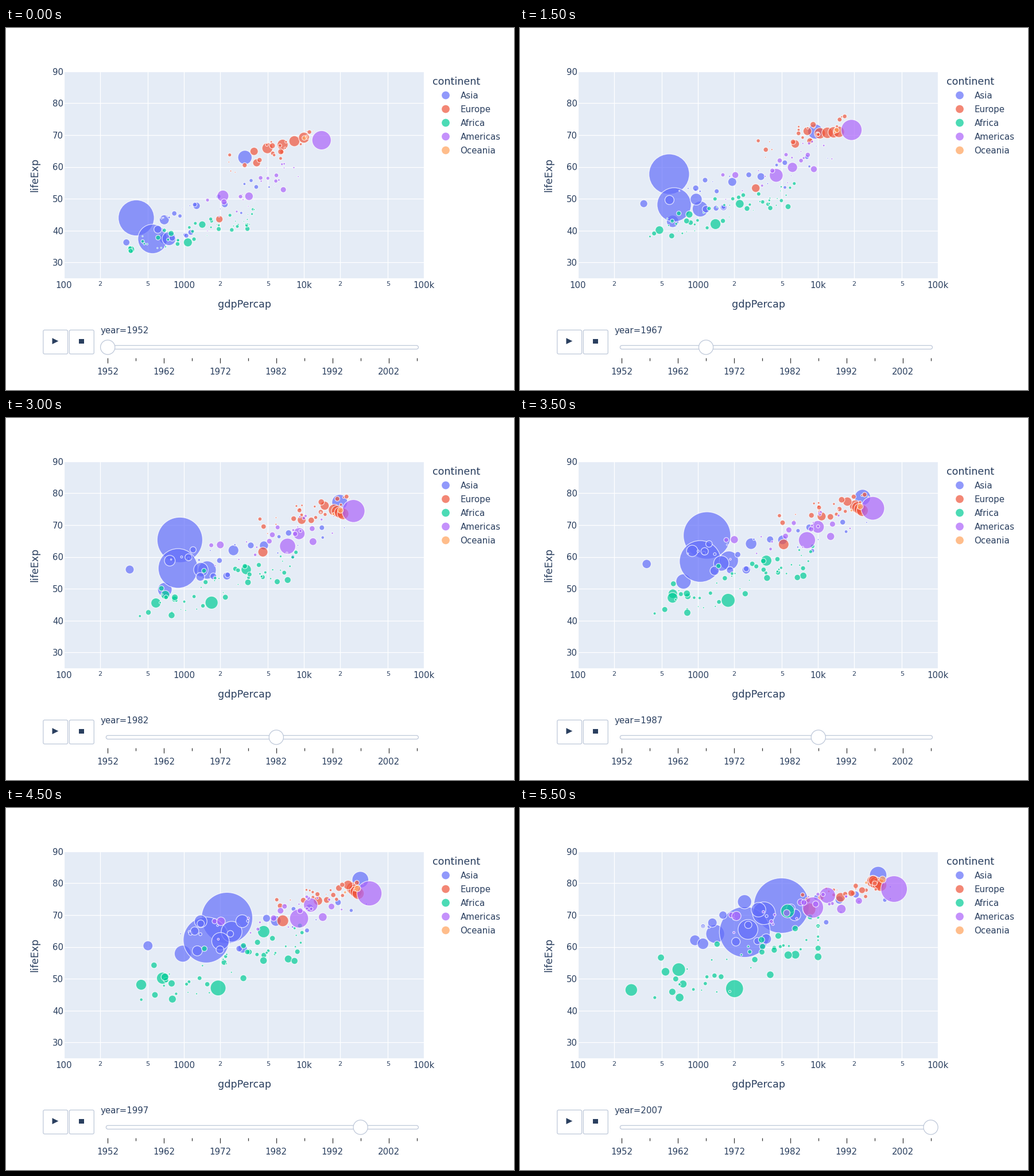
A matplotlib script that plays this animation: 885x632 px, repeating every 6000 ms.

```python
import matplotlib.pyplot as plt
import numpy as np
from matplotlib.animation import FuncAnimation
from matplotlib.colors import to_rgba
from matplotlib.patches import Circle, FancyBboxPatch, Polygon, Rectangle

W, H, DPI = 885, 632, 100
PT = 72 / DPI
LINE = 1.25 * PT
INK, BORDER = "#2a3f5f", "#bec8d9"
STEPS = 12
PROGRESS = np.linspace(0, 1, STEPS)
LEFT, RIGHT, TOP, BOTTOM = 101, 728.4, 75.9, 437.1
MAX_POP, MAX_RADIUS = 1318.7, 48.2

plt.rcParams["font.family"] = "DejaVu Sans"
rng = np.random.default_rng(12)
legend, colors, tracks = [], [], []


def curve(values):
    """Smooth polynomial through values spaced evenly over the loop."""
    knots = np.linspace(0, 1, len(values))
    return np.polyval(np.polyfit(knots, values, len(values) - 1), PROGRESS)


def continent(name, color):
    """Register a legend entry and return a function that adds its bubbles."""
    legend.append((name, color))

    def add(pop, *points, dip=0):
        """pop is (first, last) in millions, points are (income, life)."""
        gdp, life = zip(*points)
        radius = MAX_RADIUS * np.exp(curve(np.log(pop)) / 2) / MAX_POP ** 0.5
        setback = dip * np.exp(-4 * (np.arange(STEPS) - 2) ** 2)
        tracks.append((curve(np.log10(gdp)), curve(life) - setback, radius))
        colors.append(to_rgba(color, 0.7))

    return add


def swarm(add, count, pop, growth, start, end):
    """Small bubbles drifting between boxes (gdp low, gdp high, life low, life high)."""
    for _ in range(count):
        rich, luck = rng.uniform(size=2)
        health = 0.6 * rich + 0.4 * luck
        later = np.clip(rich + rng.normal(0, 0.12), 0, 1)
        (g0, l0), (g1, l1) = (
            (low * (high / low) ** u, bad + health * (good - bad))
            for u, (low, high, bad, good) in ((rich, start), (later, end)))
        middle = ((g0 * g1) ** 0.5 * np.exp(rng.normal(0.1, 0.15)),
                  (l0 + l1) / 2 + rng.normal(2.5, 1))
        size = pop[0] * (pop[1] / pop[0]) ** rng.uniform()
        add((size, size * growth), (g0, l0), middle, (g1, l1))


asia = continent("Asia", "#636efa")
asia((47, 150), (684, 37.5), (668, 48.5), (1391, 64.1))
asia((556, 1319), (400, 44), (560, 57), (830, 64.5), (1750, 68.2), (4959, 73), dip=9)
asia((372, 1110), (547, 37.4), (830, 55.2), (2452, 64.7))
asia((82, 223), (750, 37.5), (1450, 54.4), (3541, 70.6))
asia((86, 127), (3217, 63), (17950, 76.3), (31656, 82.6))
asia((20, 48), (331, 36.3), (350, 50.5), (385, 58.3), (944, 62.1))
asia((41, 169), (685, 43.4), (1300, 55), (2606, 65.5))
asia((22, 91), (1273, 47.8), (2480, 61), (3190, 71.7))
asia((26, 85), (605, 40.4), (711, 57.3), (2442, 74.2))
swarm(asia, 24, (0.4, 22), 3.3, (620, 6500, 33, 61), (1100, 40000, 57, 81))

europe = continent("Europe", "#ef553b")
for u in np.linspace(0, 1, 4):
    europe((50, 64), (4950 + 5030 * u, 65.9 + 3.3 * u), (16500 + 3500 * u, 74.1 - u),
           (28600 + 4600 * u, 80.6 - 1.2 * u))
europe((26, 38), (4029, 61.3), (9000, 71), (15390, 75.6))
europe((28, 40), (3834, 64.9), (13580, 75.4), (28821, 80.9))
europe((22, 71), (1969, 43.6), (4250, 60.3), (8458, 71.8))
swarm(europe, 23, (0.5, 15), 1.3, (2200, 14500, 57, 73), (6500, 42000, 73, 81))

africa = continent("Africa", "#00cc96")
africa((14, 65), (781, 39.1), (735, 47.8), (278, 46.5))
africa((22, 80), (1419, 41.9), (3100, 54.7), (5581, 71.3))
africa((21, 76), (362, 34.1), (567, 44.7), (691, 52.9))
africa((33, 135), (1077, 36.3), (1650, 45.2), (2014, 46.9))
swarm(africa, 48, (0.4, 11), 3, (320, 4000, 32, 47), (430, 10000, 41, 70))

americas = continent("Americas", "#ab63fa")
americas((57, 190), (2109, 50.9), (6850, 62.4), (9066, 72.4))
americas((30, 109), (3478, 50.8), (8600, 66.2), (11978, 76.2))
americas((158, 301), (13990, 68.4), (24500, 74), (42952, 78.2))
swarm(americas, 22, (0.7, 15), 2.5, (1500, 9500, 39, 67), (1900, 25000, 64, 80))

oceania = continent("Oceania", "#ffa15a")
oceania((8.7, 20.4), (10040, 69.1), (19000, 74.1), (34435, 81.2))
oceania((2, 4.1), (10557, 69.4), (16900, 73), (25185, 80.2))

tracks = np.array(tracks)

fig = plt.figure(figsize=(W / DPI, H / DPI), dpi=DPI, facecolor="white")
stage = fig.add_axes([0, 0, 1, 1])
stage.set(xlim=(0, W), ylim=(H, 0))
stage.axis("off")


def label(x, baseline, text, size=15, ha="left", **style):
    return stage.text(x, baseline, text, fontsize=size * PT, color=INK, ha=ha,
                      va="baseline", **style)


def rounded(x, y, w, h, radius):
    stage.add_patch(FancyBboxPatch((x, y), w, h, fc="white", ec=BORDER, lw=LINE,
                                   boxstyle=f"round,pad=0,rounding_size={radius}"))


plot = fig.add_axes([LEFT / W, 1 - BOTTOM / H, (RIGHT - LEFT) / W, (BOTTOM - TOP) / H],
                    facecolor="#e5ecf6", xticks=[], yticks=[])
for spine in plot.spines.values():
    spine.set_visible(False)

for life in range(30, 91, 10):
    plot.axhline(life, color="white", lw=LINE, zorder=0)
    label(100, TOP + (90 - life) * (BOTTOM - TOP) / 65 + 5.8, life, ha="right")

for power, name in enumerate(("100", "1000", "10k", "100k")):
    for digit in (1, 2, 5):
        value = 2 + power + np.log10(digit)
        if value > 5:
            continue
        plot.axvline(value, color="white", lw=LINE, zorder=0)
        x = LEFT + (value - 2) * (RIGHT - LEFT) / 3
        if digit == 1:
            label(x, 454, name, ha="center")
        else:
            label(x, 450, digit, size=11.25, ha="center")

label(415, 488, "gdpPercap", size=17.5, ha="center")
label(55, 256.5, "lifeExp", size=17.5, ha="center", rotation=90, rotation_mode="anchor")

label(743, 99, "continent", size=17.5)
for row, (name, color) in enumerate(legend):
    y = 117.5 + 24 * row
    stage.add_patch(Circle((766, y), 7.5, fc=to_rgba(color, 0.7), ec="white", lw=LINE))
    label(791.5, y + 5.5, name)

rounded(64.8, 527.3, 42.8, 41.8, 2.5)
rounded(110.3, 527.3, 43, 41.8, 2.5)
stage.add_patch(Polygon([(80.5, 541.2), (80.5, 552), (91.3, 546.6)], fc=INK, ec="none"))
stage.add_patch(Rectangle((127, 542.5), 8.8, 8.8, fc=INK, ec="none"))
rounded(174.4, 554.3, 544, 6.3, 3.1)


def slider_x(step):
    return 177.2 + 48.94 * step


for step in range(STEPS):
    major = step % 2 == 0
    stage.plot([slider_x(step)] * 2, [576.3, 585.3 if major else 581.3],
               color="#333333", lw=LINE, solid_capstyle="butt")
    if major:
        label(slider_x(step), 605, 1952 + 5 * step, ha="center")

grip = stage.add_patch(Circle((slider_x(0), 557.4), 12.6, fc="white", ec=BORDER,
                              lw=LINE, zorder=5))
year = label(164.5, 533, "")
bubbles = plot.scatter(tracks[:, 0, 0], tracks[:, 1, 0], c=colors, lw=LINE,
                       edgecolors=(1, 1, 1, 0.75), zorder=3)
plot.set(xlim=(2, 5), ylim=(25, 90))


def draw(step):
    x, y, radius = tracks[:, :, step].T
    bubbles.set_offsets(np.column_stack([x, y]))
    bubbles.set_sizes((2 * radius * PT) ** 2)
    grip.center = slider_x(step), 557.4
    year.set_text(f"year={1952 + 5 * step}")
    return bubbles, grip, year


anim = FuncAnimation(fig, draw, frames=STEPS, interval=500, repeat=True, repeat_delay=0)
plt.show()
```
